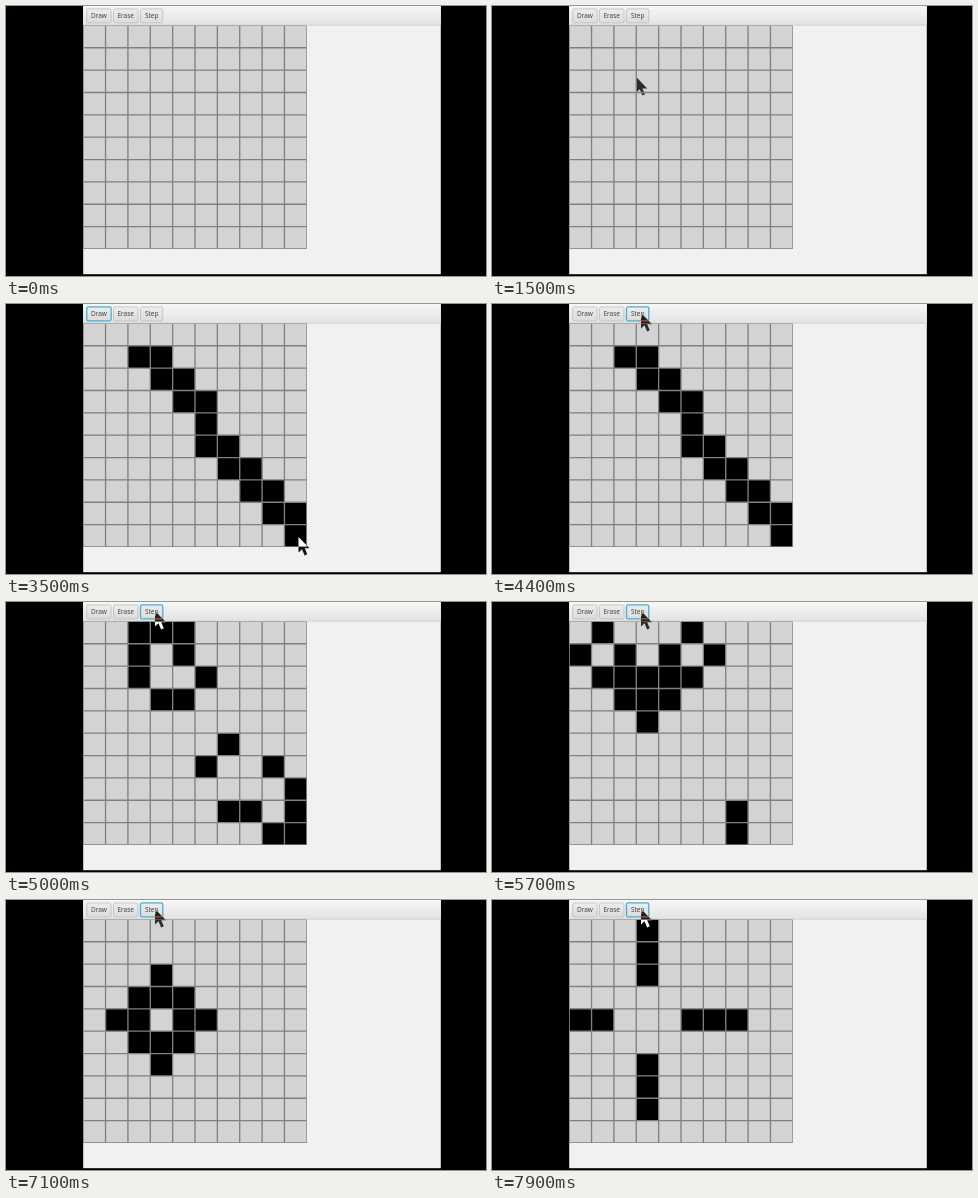
Recreate the animation shown at these times as an HTML page. Size 480 by 270 pixels, loop 8 s.

```html
<!DOCTYPE html>
<html lang="en">
<head>
<meta charset="utf-8">
<title>Game of Life</title>
<style>
  html, body { margin: 0; width: 100%; height: 100%; overflow: hidden; background: #000; }
  #stage { display: block; width: 100vw; height: 100vh; isolation: isolate; }
  text { font: 6.5px "Open Sans", "Noto Sans", sans-serif; fill: #3a3a3a; text-anchor: middle; }
  .button { fill: url(#face); stroke: #bdbdbd; stroke-width: .8; }
  .button.focus { stroke: #45b0d2; stroke-width: 1.3; }
  #cursor { fill: #fff; mix-blend-mode: difference; }
</style>
</head>
<body>
<svg id="stage" viewBox="0 0 480 270">
  <defs>
    <linearGradient id="bar" x2="0" y2="1">
      <stop offset="0" stop-color="#f7f7f7"/><stop offset="1" stop-color="#e2e2e2"/>
    </linearGradient>
    <linearGradient id="face" x2="0" y2="1">
      <stop offset="0" stop-color="#ededed"/><stop offset="1" stop-color="#dcdcdc"/>
    </linearGradient>
  </defs>
  <rect width="480" height="270"/>
  <rect x="77.2" width="357.6" height="268.2" fill="#f1f1f1"/>
  <rect x="77.2" width="357.6" height="19.3" fill="url(#bar)"/>
  <path d="M77.2 19.2H434.8" stroke="#c6c6c6" stroke-width=".6"/>
  <g id="buttons"></g>
  <!-- One unit per cell; the outer lines are clipped to half width -->
  <svg x="77.2" y="19.4" width="223.6" height="223.6" viewBox="0 0 10 10">
    <rect width="10" height="10" fill="#d3d3d3"/>
    <path id="cells"/>
    <path id="lines" stroke="#808080" stroke-width=".06"/>
  </svg>
  <path id="cursor" d="M0 0V15.4L3.5 12.2L6.1 18.4L8.8 17.2L6.2 11.3H11Z"/>
</svg>
<script>
const LOOP = 8000, TICK = 100, N = 10;
const PAINT_START = 2560, PAINT_GAP = 52;
const FOCUS_DRAW = 2100, FOCUS_STEP = 4400;
const STEP_START = 4480, STEP_GAP = 200;
const $ = id => document.getElementById(id);

// Pointer tip: time, x, y
const route = [
  [1400, 153, 82], [2050, 96, 11], [2300, 96, 11], [2500, 127, 40],
  [3080, 240, 165], [3500, 292.5, 233], [3600, 294, 236],
  [4000, 184, 31], [4250, 149, 9], [LOOP, 149, 9]
];

// The painted line walks right or down from row 1, column 2
const stroke = [N + 2];
for (const move of 'RDRDRDDRDRDRDRD') {
  stroke.push(stroke[stroke.length - 1] + (move === 'R' ? 1 : N));
}

function neighbours(live, r, c) {
  let n = 0;
  for (let y = r - 1; y <= r + 1; y++) for (let x = c - 1; x <= c + 1; x++) {
    const self = y === r && x === c;
    if (!self && x >= 0 && x < N && live.includes(y * N + x)) n++;
  }
  return n;
}

function nextGen(live) {
  return Array.from({ length: N * N }, (_, id) => id).filter(id => {
    const n = neighbours(live, Math.floor(id / N), id % N);
    return n === 3 || (n === 2 && live.includes(id));
  });
}

const gens = [stroke];
while (STEP_START + gens.length * STEP_GAP < LOOP + STEP_GAP) gens.push(nextGen(gens[gens.length - 1]));

function cellsAt(t) {
  if (t < STEP_START) return stroke.filter((_, i) => t >= PAINT_START + i * PAINT_GAP);
  return gens[1 + Math.floor((t - STEP_START) / STEP_GAP)];
}

function pointerAt(t) {
  const i = route.findIndex(p => p[0] > t);
  const [t0, x0, y0] = route[i - 1], [t1, x1, y1] = route[i];
  const k = (t - t0) / (t1 - t0);
  return [x0 + (x1 - x0) * k, y0 + (y1 - y0) * k];
}

$('buttons').innerHTML = [['Draw', 80.7, 24.4], ['Erase', 107.5, 24.5], ['Step', 134.5, 22.3]]
  .map(([label, x, w]) =>
    `<rect class="button" x="${x}" y="2.9" width="${w}" height="14" rx="1.5"/>
     <text x="${x + w / 2}" y="12.2">${label}</text>`).join('');
const faces = document.querySelectorAll('.button');

let grid = '';
for (let i = 0; i <= N; i++) grid += `M${i} 0V${N}M0 ${i}H${N}`;
$('lines').setAttribute('d', grid);

function render(t) {
  const focus = t < FOCUS_DRAW ? -1 : t < FOCUS_STEP ? 0 : 2;
  faces.forEach((face, i) => face.classList.toggle('focus', i === focus));
  $('cells').setAttribute('d', cellsAt(t)
    .map(id => `M${id % N} ${Math.floor(id / N)}h1v1h-1z`).join(''));
  const shown = t >= route[0][0];
  $('cursor').style.display = shown ? '' : 'none';
  if (shown) $('cursor').setAttribute('transform', `translate(${pointerAt(t)})`);
}

const start = performance.now();
function loop() {
  const t = Math.max(0, performance.now() - start) % LOOP;
  render(Math.floor(t / TICK) * TICK);
  requestAnimationFrame(loop);
}
loop();
</script>
</body>
</html>
```
